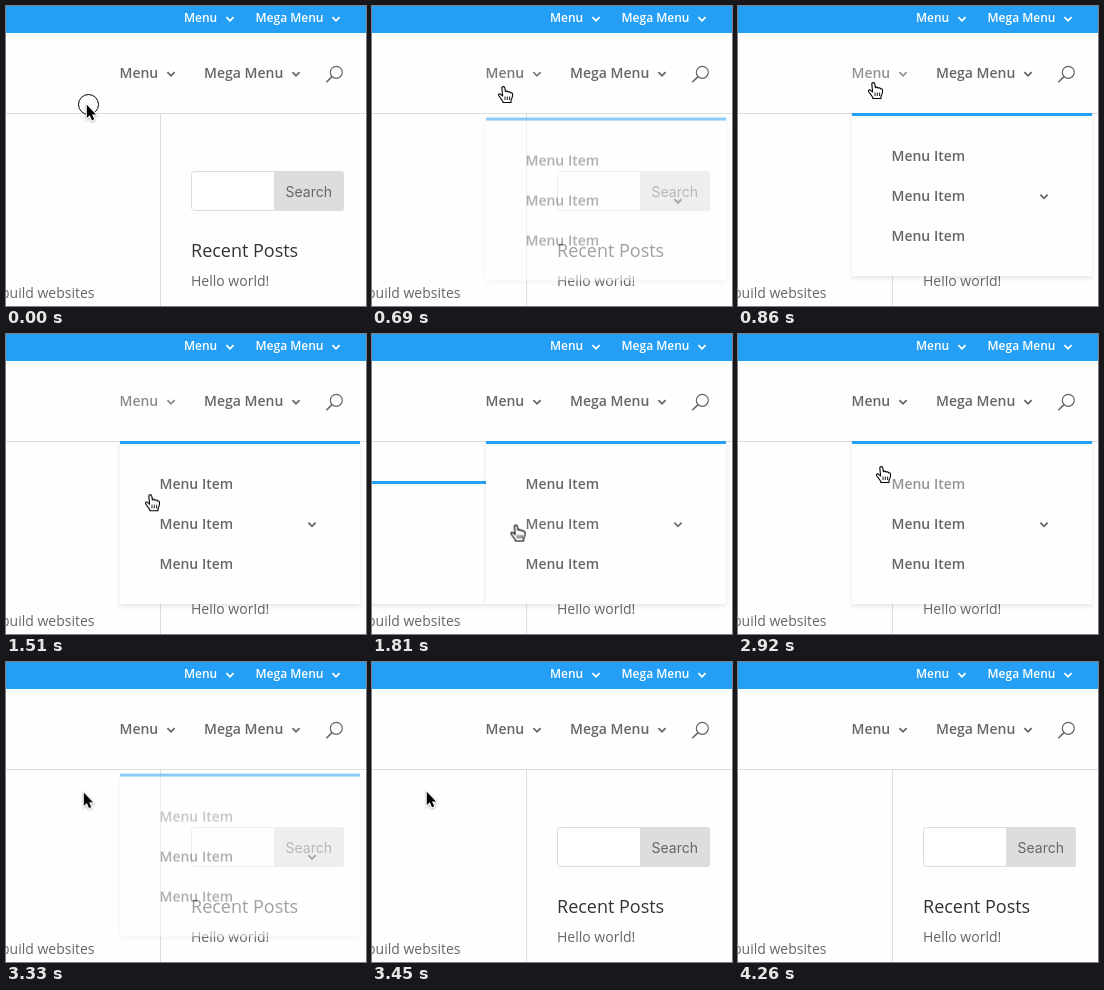
An HTML page that plays this animation: 360 by 300 pixels, repeating every 4.86 s.

```html
<!DOCTYPE html>
<html lang="en">
<head>
<meta charset="utf-8">
<title>Dropdown menu</title>
<style>
  html, body { margin: 0; width: 100%; height: 100%; overflow: hidden; background: #fefefe; }
  svg { display: block; width: 360px; height: 300px; }
  text { font: 14px "Open Sans", sans-serif; fill: #666; }
  .link text { font-weight: 600; }
  .link use { stroke: #666; }
  .top text { font-size: 12px; fill: #fff; }
  .top use { stroke: #fff; }
  .panel rect:first-child { fill: #fefefe; filter: drop-shadow(0 2px 2.5px rgba(0, 0, 0, .1)); }
  .blue { fill: #259ff5; }
  .rule { fill: #dedede; }

  .anim { animation: 4860ms linear infinite; }
  #click { animation-name: click; animation-timing-function: step-end; }
  #cursor { animation-name: travel; }
  #arrow { animation-name: arrow; animation-timing-function: step-end; }
  #hand { animation-name: hand; animation-timing-function: step-end; }
  #drop { animation-name: drop; animation-timing-function: ease-in-out; }
  #sub { animation-name: sub; animation-timing-function: ease-in-out; }
  #menu { animation-name: menu; }
  #first { animation-name: first; }
  #second { animation-name: second; }

  @keyframes click { 0% { opacity: 1; } 1.235%, 100% { opacity: 0; } }
  @keyframes arrow {
    0% { opacity: 1; }
    11.7% { opacity: 0; }
    67.1% { opacity: 1; }
    87.6%, 100% { opacity: 0; }
  }
  @keyframes hand {
    0% { opacity: 0; }
    11.7% { opacity: 1; }
    67.1%, 100% { opacity: 0; }
  }
  @keyframes travel {
    0%, 5.4% { transform: translate(80px, 98px); animation-timing-function: cubic-bezier(.4, 0, .7, .85); }
    14.198% { transform: translate(132px, 80px); animation-timing-function: ease-out; }
    16.461%, 26.75% { transform: translate(136px, 76px); animation-timing-function: cubic-bezier(.45, 0, .7, .8); }
    31.07% { transform: translate(145px, 160px); animation-timing-function: cubic-bezier(.2, .55, .5, 1); }
    39.506%, 46.708% { transform: translate(144.5px, 192px); animation-timing-function: ease-in-out; }
    57.613%, 64% { transform: translate(144px, 132px); animation-timing-function: ease-in-out; }
    70.988%, 76.3% { transform: translate(54px, 129px); animation-timing-function: cubic-bezier(.45, 0, .7, .8); }
    87.6%, 100% { transform: translate(178px, 304px); }
  }
  @keyframes drop {
    0%, 11.728% { opacity: 0; transform: translateY(10px); }
    16.461%, 66.4% { opacity: 1; transform: none; }
    70.9%, 100% { opacity: 0; transform: translateY(10px); }
  }
  @keyframes sub {
    0%, 32.5% { opacity: 0; }
    37.037%, 51.2% { opacity: 1; }
    55.8%, 100% { opacity: 0; }
  }
  @keyframes menu {
    0%, 11.728% { opacity: 1; }
    17.695%, 29.8% { opacity: .7; }
    37.037%, 100% { opacity: 1; }
  }
  @keyframes first {
    0%, 52.2% { opacity: 1; }
    60.082%, 100% { opacity: .7; }
  }
  @keyframes second {
    0%, 36.8% { opacity: 1; }
    39.506%, 51.2% { opacity: .7; }
    57.6%, 100% { opacity: 1; }
  }
</style>
</head>
<body>
<svg viewBox="0 0 360 300">
  <defs>
    <path id="chevron" d="M-3.6 -1.8 L0 1.8 L3.6 -1.8" fill="none" stroke-width="1.8"/>
  </defs>

  <!-- Page -->
  <rect class="rule" x="154" y="108" width="1" height="192"/>
  <text x="88.5" y="292" text-anchor="end">build websites</text>
  <rect x="185.5" y="165.5" width="152" height="39" rx="3" fill="#fff" stroke="#ddd"/>
  <path d="M268 165 H335 a3 3 0 0 1 3 3 V202 a3 3 0 0 1 -3 3 H268 Z" fill="#ddd"/>
  <text x="279.5" y="191" style="font-family: Inter, sans-serif">Search</text>
  <text x="185" y="251" style="font-size: 18px; fill: #333">Recent Posts</text>
  <text x="185" y="280">Hello world!</text>

  <!-- Header -->
  <rect class="blue" width="360" height="27"/>
  <rect class="rule" y="107" width="360" height="1"/>
  <g class="link top">
    <text x="178" y="16">Menu</text>
    <use href="#chevron" x="224" y="13"/>
    <text x="249.5" y="16">Mega Menu</text>
    <use href="#chevron" x="330" y="13"/>
  </g>
  <g class="link anim" id="menu">
    <text x="113.5" y="72">Menu</text>
    <use href="#chevron" x="165" y="68"/>
  </g>
  <g class="link">
    <text x="198" y="72">Mega Menu</text>
    <use href="#chevron" x="290" y="68"/>
  </g>
  <g fill="none" stroke="#666" stroke-width="1.2">
    <circle cx="330.3" cy="66.3" r="6"/>
    <path d="M326 70.6 L320.3 76.3" stroke-width="1.6"/>
  </g>

  <!-- Dropdowns -->
  <g class="panel anim" id="sub">
    <rect x="-126" y="147" width="240" height="123"/>
    <rect class="blue" x="-126" y="147" width="240" height="3"/>
  </g>
  <g class="panel anim" id="drop">
    <rect x="114" y="107" width="240" height="163"/>
    <rect class="blue" x="114" y="107" width="240" height="3"/>
    <g class="link anim" id="first"><text x="153.5" y="155">Menu Item</text></g>
    <g class="link anim" id="second">
      <text x="153.5" y="195">Menu Item</text>
      <use href="#chevron" x="306" y="190.5"/>
    </g>
    <g class="link"><text x="153.5" y="235">Menu Item</text></g>
  </g>

  <!-- Pointer -->
  <circle class="anim" id="click" cx="82.5" cy="98.5" r="10" fill="none" stroke="#000"/>
  <g class="anim" id="cursor">
    <path class="anim" id="arrow" d="M.8 .8 V14 L3.8 11.2 L6 16.2 L8.2 15.2 L6 10.4 H10 Z"
      stroke="#fff" stroke-width="2" paint-order="stroke" style="filter: drop-shadow(0 1px 1px rgba(0, 0, 0, .3))"/>
    <g class="anim" id="hand" fill="#fff" stroke="#000" stroke-width="1.1" stroke-linejoin="round">
      <path d="M-2.2 1.9 C-2.2 .2 .6 .2 .8 1.9 L1.4 5.6 C2 4.8 3.8 5 4 6.2 C4.8 5.4 6.3 5.8 6.5 7
        C7.4 6.5 8.6 7 8.6 8.4 C8.6 11.6 8 12.2 7 14.2 V16.5 H-1 C-1 14.6 -3 13.4 -5.3 9.8
        C-6.2 8.2 -4.4 7.2 -3 8.6 L-1.4 10 Z"/>
      <path d="M1 10.5 V14 M3.3 10.5 V14 M5.6 10.5 V14" stroke-width=".9"/>
    </g>
  </g>
</svg>
</body>
</html>
```
